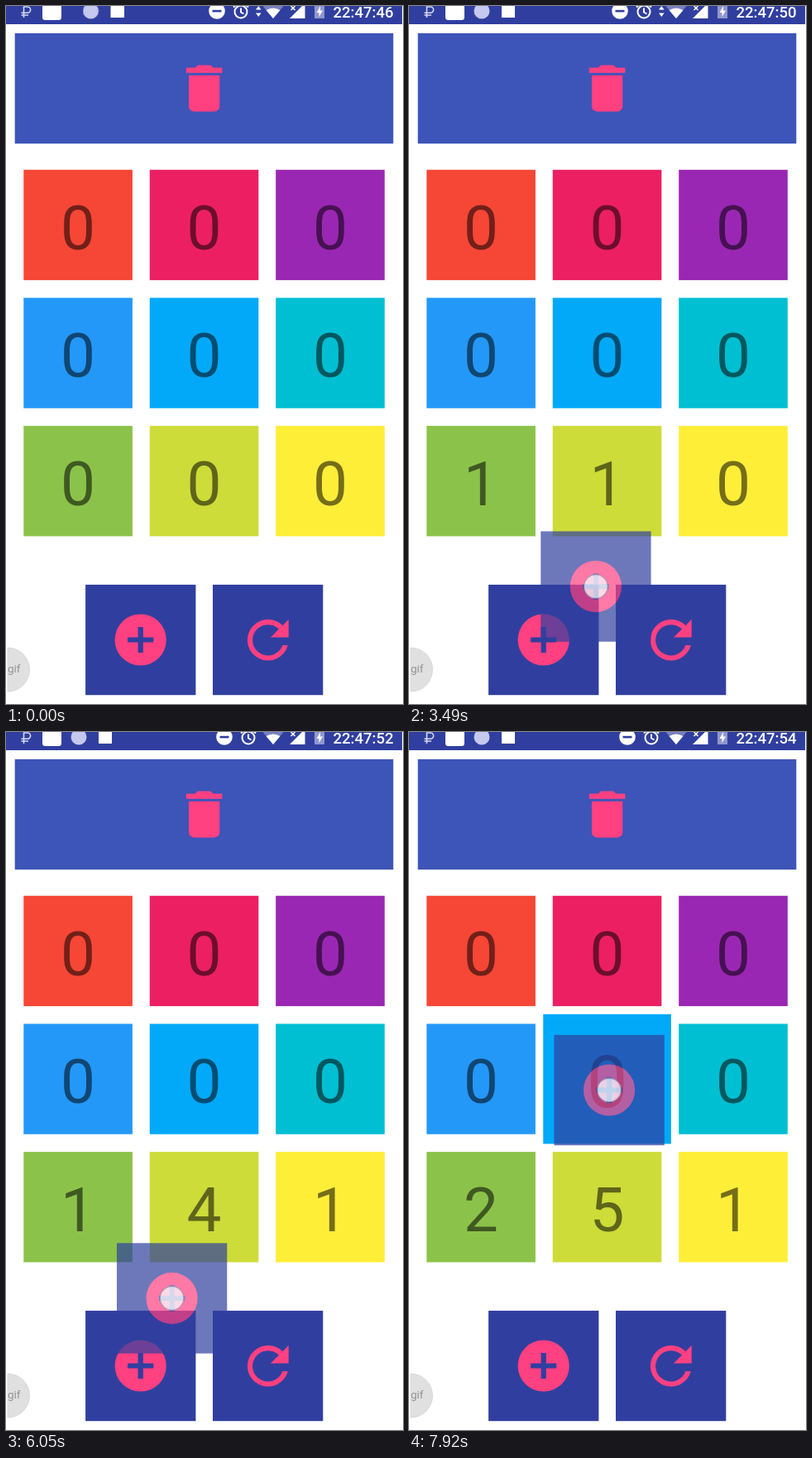
An HTML page that plays this animation: 480 by 843 pixels, repeating every 8000 ms.

```html
<!DOCTYPE html>
<html lang="en">
<head>
<meta charset="utf-8">
<title>Drag and drop counters</title>
<style>
  html, body { margin: 0; width: 100%; height: 100%; overflow: hidden; background: #fff; }
  svg { display: block; width: 480px; height: 843px; font-family: Roboto, sans-serif; }
  .bar { fill: #303f9f; }
  .pink { fill: #ff4081; }
  .digit { font-size: 74.7px; text-anchor: middle; fill: #000; fill-opacity: .54; }
  .clock { font-size: 18.5px; font-weight: 500; text-anchor: end; fill: #fff; }
  .slide { animation: slide 8s cubic-bezier(.2, .6, .4, 1) infinite; }
  @keyframes slide {
    0%, .8% { transform: translateX(14.5px); }
    7.5%, 100% { transform: none; }
  }
</style>
</head>
<body>
<svg viewBox="0 0 480 843">
  <defs>
    <rect id="square" class="bar" x="-66.6" y="-66.6" width="133.3" height="133.3"/>
    <g id="add">
      <use href="#square"/>
      <path class="pink" fill-rule="evenodd" transform="scale(3.11)" d="M-10 0a10 10 0 1 1 20 0a10 10 0 1 1-20 0zM-1-5h2v4h4v2h-4v4h-2v-4h-4v-2h4z"/>
    </g>
  </defs>

  <rect class="bar" width="479" height="22"/>
  <path d="M21.5 14V1H26a3.6 3.6 0 0 1 0 7.2H18.5M18.5 11H27" fill="none" stroke="#d5d8f2" stroke-width="1.6"/>
  <rect x="44" y="-6" width="23" height="23" rx="3.5" fill="#fff"/>
  <g class="slide">
    <circle cx="88" cy="6" r="9.5" fill="#c5c8ef"/>
    <rect x="112" y="-1" width="16" height="15" fill="#fff"/>
  </g>
  <g id="alerts">
    <circle cx="255" cy="6" r="9.8" fill="#fff"/>
    <rect class="bar" x="249.5" y="4.8" width="11" height="2.6"/>
    <g fill="none" stroke="#fff" stroke-width="2">
      <circle cx="284" cy="7" r="7.5"/>
      <path d="M284 2.5V7.5l3.5 2M275 1.5l4-3.5M293 1.5l-4-3.5"/>
    </g>
  </g>
  <path id="arrows" d="M302 4.5l3.3-4.5 3.3 4.5zM302 8.5h6.6l-3.3 4.5z" fill="#fff"/>
  <path d="M310.5 0h25L323 15z" fill="#7780c1"/>
  <path d="M314.5 5q8.5-5 17 0L323 15z" fill="#fff"/>
  <path d="M343 15h18.5V-3.5z" fill="#fff"/>
  <path d="M344.5 0l5 5m0-5l-5 5" stroke="#fff" stroke-width="1.5"/>
  <rect x="373" y="-2" width="12" height="17" fill="#8f97cf"/>
  <path d="M380 0l-4.5 8h3v5l4.5-7.5h-3z" fill="#fff"/>
  <text id="clock" class="clock" x="468.5" y="13.5"></text>

  <rect x="10.7" y="32.9" width="457.6" height="133.3" fill="#3d54b8"/>
  <path class="pink" transform="translate(202.3 62.1) scale(3.11)" d="M6 19a2 2 0 0 0 2 2h8a2 2 0 0 0 2-2V7H6zM19 4h-3.5l-1-1h-5l-1 1H5v2h14z"/>

  <g id="tiles"></g>

  <use href="#add" x="162.7" y="765.5"/>
  <use href="#square" x="316.6" y="765.5"/>
  <path class="pink" transform="translate(316.8 765.7) scale(3.11)" d="M5.65-5.65A8 8 0 1 0 7.73 2H5.65A6 6 0 1 1 4.22-4.22L1-1H8V-8z"/>

  <path d="M2 775a26.5 26.5 0 0 1 0 53z" fill="#e1e0e1" stroke="#d2d2d2" stroke-width=".8"/>
  <text x="2" y="804.5" font-size="13.5" fill="#929292">gif</text>

  <g id="drag">
    <use href="#add" opacity=".7"/>
    <circle r="14.3" fill="#fff" fill-opacity=".72" stroke="#8d8fae" stroke-opacity=".6" stroke-width="1.4"/>
  </g>
</svg>
<script>
const LOOP = 8000, LAG = 60, GROW = 1.175, GRAB_Y = 764, LAND_X = 6;
const $ = id => document.getElementById(id);
const colors = ['#f64636', '#ec1f63', '#9a27b3', '#2498f8', '#02a9f8', '#00bfd2', '#8bc34a', '#cddc39', '#ffee38'];

const tiles = colors.map((color, i) => {
  const x = 87.1 + i % 3 * 152.45, y = 264.4 + Math.floor(i / 3) * 154.65;
  $('tiles').insertAdjacentHTML('beforeend',
    `<g><rect x="-65.8" y="-66.6" width="131.6" height="133.3" fill="${color}"/><text class="digit" y="29.3">0</text></g>`);
  const node = $('tiles').lastElementChild;
  return { x, y, node, label: node.lastElementChild };
});

// bow: how far the path swings sideways on its way to the tile
const drag = (tile, start, end, bow = 0, grabX = 163) => ({ tile, start, end, bow, grabX });
const drags = [
  drag(6, 1740, 2272, 11),
  drag(7, 2615, 3011, -36),
  drag(8, 3400, 3900, -20),
  drag(7, 4160, 4650, 0, 181),
  drag(7, 4760, 5200, 0, 184),
  drag(7, 5390, 5800, 0, 184),
  drag(7, 5930, 6436, 3),
  drag(6, 6700, 7040),
  drag(4, 7095, 8124, -72, 183.5)
];

function position({ tile, start, end, bow, grabX }, t) {
  const left = 1 - Math.max(0, t - start) / (end - start);
  const e = 1 - left * left;
  const { x, y } = tiles[tile];
  return [
    grabX + (x + LAND_X - grabX) * e + bow * Math.sin(Math.PI * e) ** 2,
    GRAB_Y + (y - GRAB_Y) * e
  ];
}

function render(t) {
  const active = drags.find(d => t >= d.start && t < d.end);
  const touch = active && position(active, t - LAG);

  tiles.forEach((tile, i) => {
    const over = touch && Math.abs(touch[0] - tile.x) < 66 && Math.abs(touch[1] - tile.y) < 66.5;
    tile.node.setAttribute('transform', `translate(${tile.x} ${tile.y}) scale(${over ? GROW : 1})`);
    tile.label.textContent = drags.filter(d => d.tile === i && t >= d.end).length;
  });

  $('drag').style.display = active ? '' : 'none';
  if (active) $('drag').setAttribute('transform', `translate(${position(active, t)})`);

  const synced = t >= 5000;
  $('arrows').style.display = synced ? 'none' : '';
  $('alerts').setAttribute('transform', `translate(${synced ? 9 : 0} 0)`);
  $('clock').textContent = '22:47:' + (46 + Math.floor((t + 590) / 1000));
}

const begin = performance.now();
function frame() {
  render((performance.now() - begin) % LOOP);
  requestAnimationFrame(frame);
}
frame();
</script>
</body>
</html>
```
